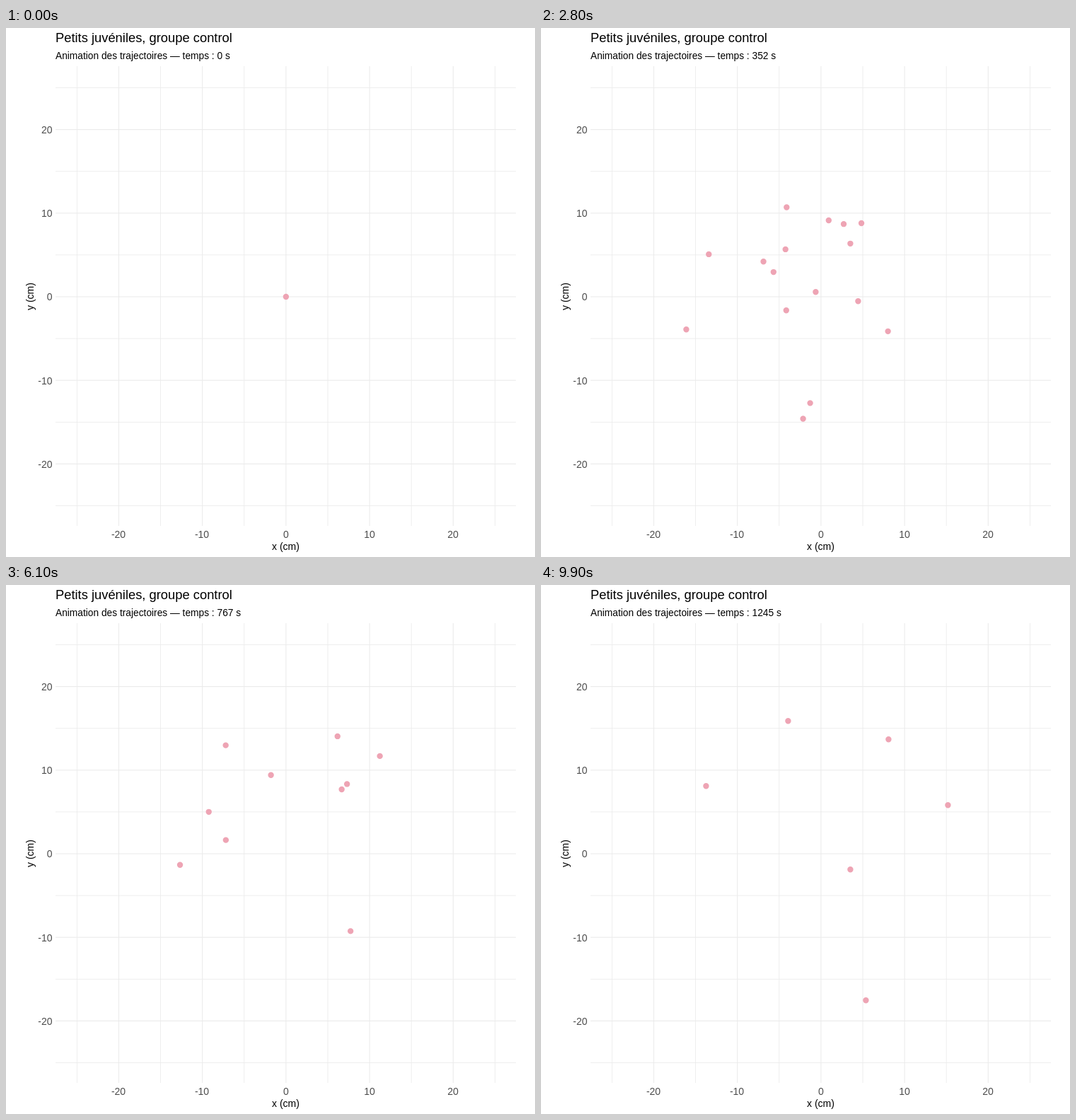
These frames come from a looping animation (748 px wide and 748 px high, 10000 ms). An HTML page with a canvas:

```html
<!DOCTYPE html>
<html lang="fr">
<head>
<meta charset="utf-8">
<title>Trajectoires</title>
<style>
  html, body { margin: 0; width: 100%; height: 100%; overflow: hidden; background: #fff; }
  canvas { display: block; }
</style>
</head>
<body>
<canvas id="plot" width="748" height="748"></canvas>
<script>
const ctx = document.getElementById('plot').getContext('2d');
const FRAMES = 100, STEP = 100, DURATION = 1245;
const CENTRE = { x: 395.9, y: 380 }, GRID = 59.1;
const PANEL = { left: 70, top: 54, width: 651, height: 650 };

// Animals leave the centre and head for up to three x, y points, reached at
// these steps. Each group is followed until its last step.
const REACHED = [19, 47, 99];
const groups = [
  { last: 99, paths: [
    [381, 300, 460, 212, 491, 218],
    [425, 304, 511, 216, 575, 311],
    [399, 291, 488, 247, 437, 402],
    [371, 260, 296, 239, 349, 192],
    [318, 328, 306, 334, 233, 284],
    [487, 417, 497, 453, 459, 587]
  ] },
  { last: 88, paths: [
    [401, 328, 513, 255, 397, 352],
    [353, 320, 329, 297, 497, 191],
    [330, 348, 325, 338, 271, 421],
    [242, 300, 226, 361, 299, 489]
  ] },
  { last: 54, paths: [[349, 496, 446, 602], [357, 522, 398, 616]] },
  { last: 42, paths: [[383, 408, 269, 380]] },
  { last: 30, paths: [[205, 426], [388, 373], [448, 386]] }
];

const mix = (a, b, u) => a + (b - a) * u;

function position(path, step) {
  let from = { step: 0, ...CENTRE };
  for (let i = 0; i < path.length / 2; i++) {
    const to = { step: REACHED[i], x: path[2 * i] + 0.4, y: path[2 * i + 1] + 0.3 };
    if (step <= to.step) {
      const u = (step - from.step) / (to.step - from.step);
      return { x: mix(from.x, to.x, u), y: mix(from.y, to.y, u) };
    }
    from = to;
  }
  return from;
}

function label(text, x, y, size, color = '#000', align = 'left') {
  ctx.font = size + 'px "Liberation Sans", Arial, sans-serif';
  ctx.fillStyle = color;
  ctx.textAlign = align;
  ctx.fillText(text, x, y);
}

function drawAxes() {
  for (let k = -5; k <= 5; k++) {
    const x = CENTRE.x + k * GRID, y = CENTRE.y - k * GRID;
    const major = k % 2 === 0;
    const weight = major ? 1.1 : 0.85;
    ctx.fillStyle = '#ebebeb';
    ctx.fillRect(x - weight / 2, PANEL.top, weight, PANEL.height);
    ctx.fillRect(PANEL.left, y - weight / 2, PANEL.width, weight);
    if (major) {
      label(k * 5, Math.round(x - 0.4), 721, 14, '#4d4d4d', 'center');
      label(k * 5, 65.5, Math.round(y + 5.4), 14, '#4d4d4d', 'right');
    }
  }
  label('x (cm)', 395.5, 738, 14, '#000', 'center');
  ctx.save();
  ctx.translate(39, 379.5);
  ctx.rotate(-Math.PI / 2);
  label('y (cm)', 0, 0, 14, '#000', 'center');
  ctx.restore();
}

// One shared path keeps overlapping dots from darkening their edges.
function drawAnimals(step) {
  ctx.fillStyle = '#eea4b4';
  ctx.beginPath();
  for (const { last, paths } of groups) {
    if (step > last) continue;
    for (const path of paths) {
      const { x, y } = position(path, step);
      ctx.moveTo(x + 4.2, y);
      ctx.arc(x, y, 4.2, 0, 2 * Math.PI);
    }
  }
  ctx.fill();
}

function draw(step) {
  ctx.fillStyle = '#fff';
  ctx.fillRect(0, 0, 748, 748);
  drawAxes();
  label('Petits juvéniles, groupe control', 70, 20, 18.35);
  const seconds = Math.round(step * DURATION / (FRAMES - 1));
  label(`Animation des trajectoires — temps : ${seconds} s`, 70, 44, 13.75);
  drawAnimals(step);
}

const start = performance.now();
function tick() {
  draw(Math.floor((performance.now() - start) / STEP) % FRAMES);
  requestAnimationFrame(tick);
}
tick();
</script>
</body>
</html>
```
